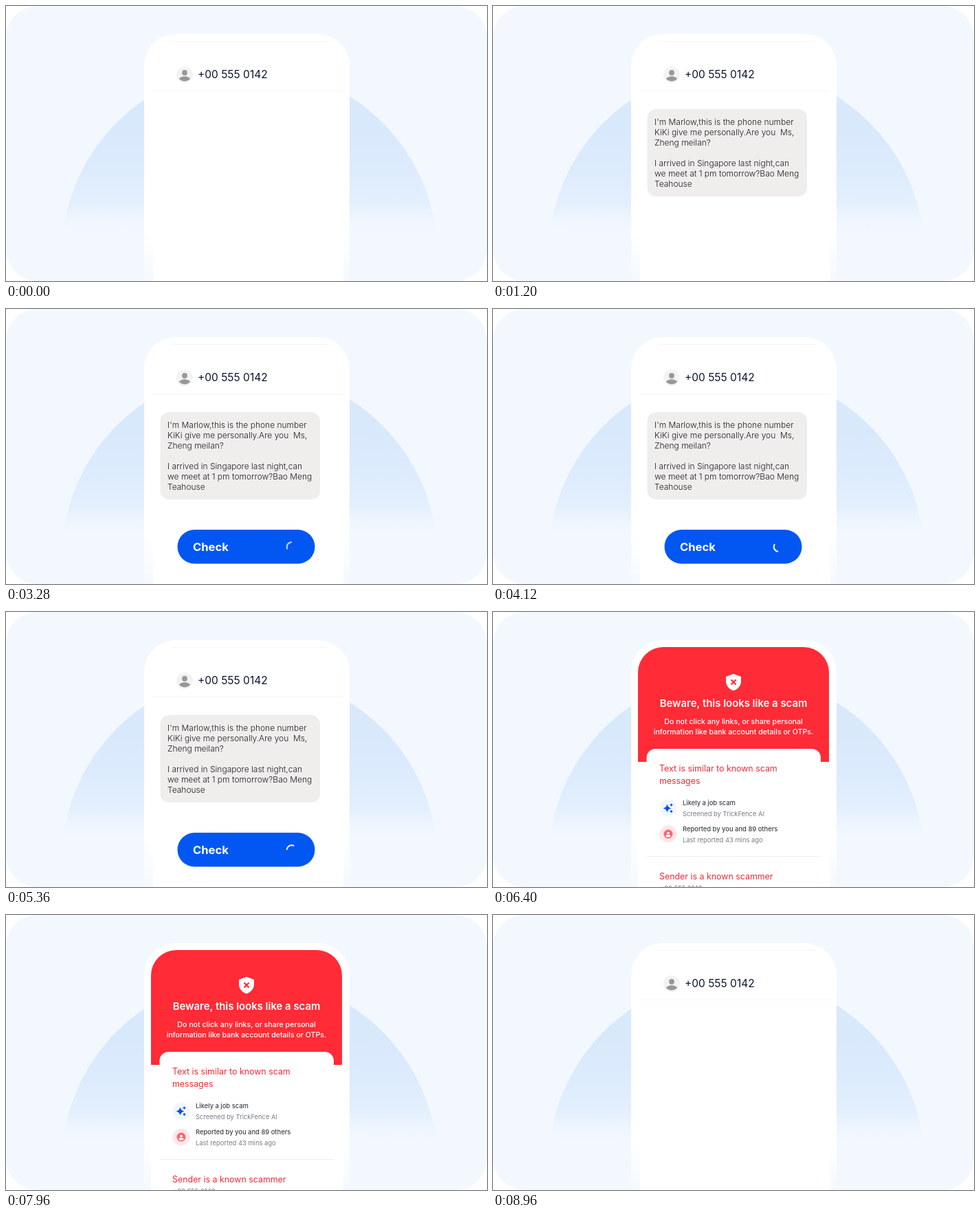
An HTML page with a canvas that plays this animation: 700 by 400 pixels, repeating every 9 s.

```html
<!DOCTYPE html>
<html lang="en">
<head>
<meta charset="utf-8">
<title>Message check</title>
<style>
  html, body { margin: 0; width: 100%; height: 100%; overflow: hidden; background: #fff; }
  canvas { display: block; width: 700px; height: 400px; }
</style>
</head>
<body>
<canvas id="stage" width="700" height="400"></canvas>
<script>
const ctx = document.getElementById('stage').getContext('2d');
const LOOP = 9000;
const PHONE = '+00 555 0142';
const RED = '#ff2b36';

const clamp = v => Math.max(0, Math.min(1, v));
const ease = v => 1 - Math.pow(1 - v, 3);
const ramp = (t, from, to) => ease(clamp((t - from) / (to - from)));

function box(x, y, w, h, r, fill) {
  ctx.beginPath();
  ctx.roundRect(x, y, w, h, r);
  ctx.fillStyle = fill;
  ctx.fill();
}

function disc(x, y, r, fill) {
  ctx.beginPath();
  ctx.arc(x, y, r, 0, Math.PI * 2);
  ctx.fillStyle = fill;
  ctx.fill();
}

function text(str, x, y, size, weight, fill, align = 'left') {
  ctx.font = `${weight} ${size}px Inter, sans-serif`;
  ctx.textAlign = align;
  ctx.fillStyle = fill;
  ctx.fillText(str, x, y);
}

function fade(stops, y0, y1) {
  const g = ctx.createLinearGradient(0, y0, 0, y1);
  stops.forEach((c, i) => g.addColorStop(i / (stops.length - 1), c));
  return g;
}

// Draws a part with its own opacity and vertical shift.
function layer(alpha, dy, draw) {
  if (alpha <= 0) return;
  ctx.save();
  ctx.globalAlpha *= alpha;
  ctx.translate(0, dy);
  draw();
  ctx.restore();
}

function person(x, y, s, fill) {
  disc(x, y - 3 * s, 3.9 * s, fill);
  ctx.beginPath();
  ctx.moveTo(x - 8 * s, y + 6 * s);
  ctx.bezierCurveTo(x - 5 * s, y + 1 * s, x + 5 * s, y + 1 * s, x + 8 * s, y + 6 * s);
  ctx.bezierCurveTo(x + 4 * s, y + 10.5 * s, x - 4 * s, y + 10.5 * s, x - 8 * s, y + 6 * s);
  ctx.fill();
}

function sparkle(x, y, r, fill) {
  ctx.beginPath();
  ctx.moveTo(x, y - r);
  for (let i = 1; i <= 4; i++) {
    const a = i * Math.PI / 2 - Math.PI / 2, m = a - Math.PI / 4;
    ctx.quadraticCurveTo(x + Math.cos(m) * r * .25, y + Math.sin(m) * r * .25,
                         x + Math.cos(a) * r, y + Math.sin(a) * r);
  }
  ctx.fillStyle = fill;
  ctx.fill();
}

function shield(x, y) {
  ctx.beginPath();
  ctx.moveTo(x, y - 12);
  ctx.lineTo(x + 11, y - 8);
  ctx.lineTo(x + 11, y - 1);
  ctx.bezierCurveTo(x + 11, y + 6, x + 5, y + 11, x, y + 12.5);
  ctx.bezierCurveTo(x - 5, y + 11, x - 11, y + 6, x - 11, y - 1);
  ctx.lineTo(x - 11, y - 8);
  ctx.closePath();
  ctx.fillStyle = '#fff';
  ctx.fill();
  ctx.beginPath();
  for (const s of [1, -1]) {
    ctx.moveTo(x - 3.5 * s, y - 3.5);
    ctx.lineTo(x + 3.5 * s, y + 3.5);
  }
  ctx.strokeStyle = RED;
  ctx.lineWidth = 2.2;
  ctx.stroke();
}

function backdrop() {
  ctx.fillStyle = '#fff';
  ctx.fillRect(0, 0, 700, 400);
  box(0, 0, 700, 400, 46, '#f2f8fe');
  ctx.save();
  ctx.beginPath();
  ctx.rect(0, 0, 700, 336);
  ctx.clip();
  disc(354.5, 363, 273.5, fade(['#d9e9fc', '#d9e9fc', '#dcebfd', '#e3effd', 'rgba(242,248,254,0)'], 130, 338));
  ctx.restore();
  box(201, 41, 299, 359, [46, 46, 0, 0], fade(['#fff', '#fff', '#fff', '#fff', '#fff', 'rgba(255,255,255,.2)'], 41, 400));
  box(214, 51, 277, 349, [37, 37, 0, 0], '#fff');
}

function header() {
  ctx.fillStyle = '#f3f5f7';
  ctx.fillRect(240, 51, 230, 1);
  ctx.fillRect(212, 123, 279, 1);
  disc(260, 100, 12, '#f3f3f3');
  person(260, 100, 1, '#989898');
  text(PHONE, 279, 105, 15.5, 400, '#0b1530');
}

function bubble() {
  box(224.5, 150, 232.5, 127, 13, '#f0eeed');
  const lines = [
    "I'm Marlow,this is the phone number",
    'KiKi give me personally.Are you  Ms,',
    'Zheng meilan?',
    '',
    'I arrived in Singapore last night,can',
    'we meet at 1 pm tomorrow?Bao Meng',
    'Teahouse'
  ];
  lines.forEach((s, i) => text(s, 235, 173 + i * 15, 12, 300, '#1c1d21'));
}

function button() {
  box(249.5, 321, 200, 49.5, 25, '#0257f2');
  text('Check', 272, 352, 16.6, 700, '#fff');
}

function spinner(t) {
  const a = 1.75 + (t - 4120) / 1000 * Math.PI * 2;
  ctx.beginPath();
  ctx.arc(415.5, 346, 6.8, a, a + 1.9);
  ctx.strokeStyle = '#fff';
  ctx.lineWidth = 2;
  ctx.lineCap = 'round';
  ctx.stroke();
}

function warning() {
  box(211, 51, 278, 349, [37, 37, 0, 0], '#fff');
  box(211, 51, 278, 167, [37, 37, 0, 0], RED);
  box(223.5, 199, 253.5, 201, [13, 13, 0, 0], '#fff');
  shield(350, 102);
  text('Beware, this looks like a scam', 350, 138, 14.9, 600, '#fff', 'center');
  text('Do not click any links, or share personal', 350, 162.5, 10.6, 500, '#fff', 'center');
  text('information like bank account details or OTPs.', 350, 177.5, 10.6, 500, '#fff', 'center');

  const head = '#f02a36', dark = '#3a3f47', grey = '#767c85';
  text('Text is similar to known scam', 242, 232, 12.4, 400, head);
  text('messages', 242, 250, 12.4, 400, head);

  disc(255, 285, 12.5, '#f1f6fe');
  sparkle(253.5, 285.5, 6, '#0a52d8');
  sparkle(259.5, 280.5, 2.6, '#0a52d8');
  sparkle(259.5, 290, 2.6, '#0a52d8');
  text('Likely a job scam', 276, 280.5, 9.4, 500, dark);
  text('Screened by TrickFence AI', 276, 296.5, 9.4, 400, grey);

  disc(255, 323, 12.5, '#ffe6e8');
  disc(255, 323, 6.5, '#fa6670');
  person(255, 323, .48, '#fff');
  text('Reported by you and 89 others', 276, 318.5, 9.4, 500, dark);
  text('Last reported 43 mins ago', 276, 334.5, 9.4, 400, grey);

  ctx.fillStyle = '#eeeff1';
  ctx.fillRect(224, 355, 253, 1);
  text('Sender is a known scammer', 242, 388.5, 12.4, 400, head);
  text(PHONE, 243, 405, 9.4, 400, grey);
}

function draw(t) {
  backdrop();
  header();
  const shown = ramp(t, 500, 950);
  const ready = ramp(t, 1650, 2100);
  const alert = ramp(t, 5600, 6050);
  const reset = 1 - ramp(t, 8450, 8850);
  if (t < 8000) {
    layer(shown, 14 * (1 - shown), bubble);
    layer(ready, 14 * (1 - ready), button);
    layer(ramp(t, 3200, 3400), 0, () => spinner(t));
  }
  layer(alert * reset, 0, warning);
}

const start = performance.now();
function tick() {
  const t = (performance.now() - start) % LOOP;
  draw(Math.floor(t / 40) * 40);
  requestAnimationFrame(tick);
}
tick();
</script>
</body>
</html>
```
